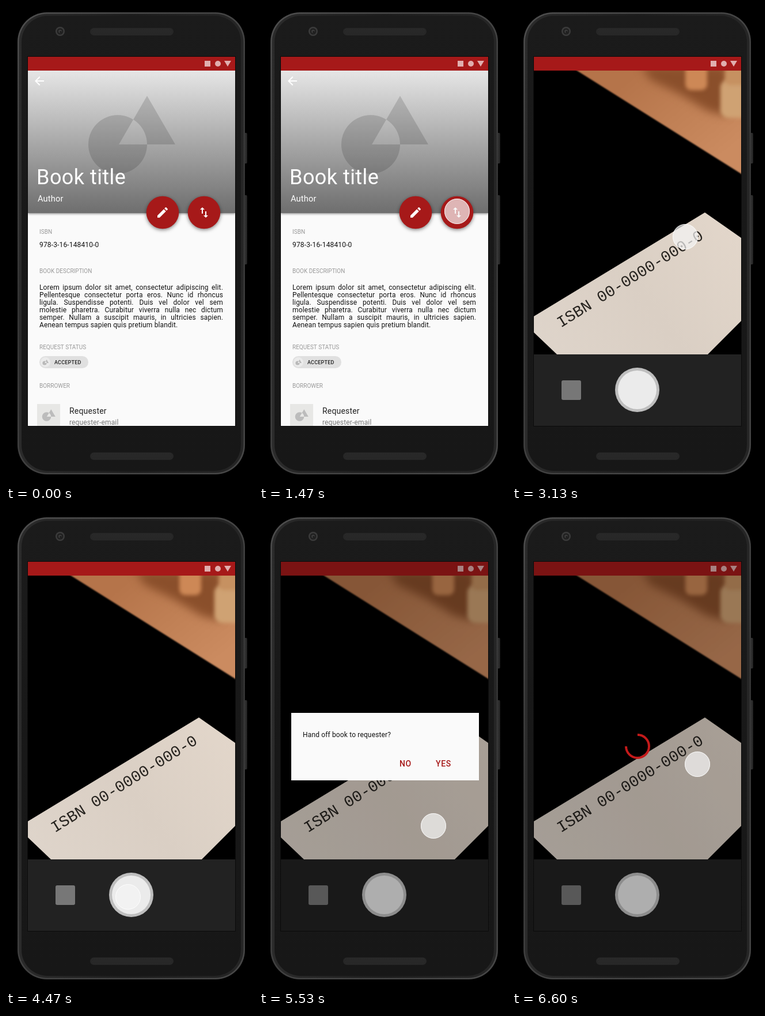
An HTML page with a canvas that plays this animation: 429 px wide and 827 px high, repeating every 8 s.

```html
<!DOCTYPE html>
<html lang="en">
<head>
<meta charset="utf-8">
<title>Book hand-off</title>
<style>
html, body { margin: 0; width: 100%; height: 100%; overflow: hidden; background: #000; }
canvas { display: block; width: 100%; height: 100%; }
</style>
</head>
<body>
<canvas id="stage" width="429" height="827"></canvas>
<script>
const ctx = document.getElementById('stage').getContext('2d');
const LOOP = 8000;
const RED = '#a61919';
const SANS = 'Roboto, sans-serif';

const ICONS = {
  back: 'M20 11H7.83l5.59-5.59L12 4l-8 8 8 8 1.41-1.41L7.83 13H20z',
  edit: 'M3 17.25V21h3.75L17.81 9.94l-3.75-3.75zM20.71 7.04c.39-.39.39-1.02 0-1.41l-2.34-2.34c-.39-.39-1.02-.39-1.41 0l-1.83 1.83 3.75 3.75z',
  swap: 'M16 17.01V10h-2v7.01h-3L15 21l4-3.99zM9 3L5 6.99h3V14h2V6.99h3z'
};

const LOREM = [
  'Lorem ipsum dolor sit amet, consectetur adipiscing elit.',
  'Pellentesque consectetur porta eros. Nunc id rhoncus',
  'ligula. Suspendisse potenti. Duis vel dolor vel sem',
  'molestie pharetra. Curabitur viverra nulla nec dictum',
  'semper. Nullam a suscipit mauris, in ultricies sapien.',
  'Aenean tempus sapien quis pretium blandit.'
];

// Touch positions after the entrance: [time, x, y]
const TOUCH = [
  [1470, 344, 356], [2600, 343, 358], [3070, 332, 371], [3130, 301, 400],
  [3470, 243, 582], [3870, 236, 655], [4130, 211, 673], [4470, 212, 669],
  [5330, 226, 650], [5470, 266, 596], [5530, 303, 546], [5930, 324, 454],
  [6130, 324, 462], [6200, 323, 466], [6270, 323, 446], [6600, 322, 439]
];

function rect(x, y, w, h, fill, r = 0) {
  ctx.fillStyle = fill;
  ctx.beginPath();
  ctx.roundRect(x, y, w, h, r);
  ctx.fill();
}

function disc(x, y, r, fill) {
  ctx.fillStyle = fill;
  ctx.beginPath();
  ctx.arc(x, y, r, 0, Math.PI * 2);
  ctx.fill();
}

function poly(points, fill) {
  ctx.fillStyle = fill;
  ctx.beginPath();
  for (const [x, y] of points) ctx.lineTo(x, y);
  ctx.fill();
}

function gradient(x0, y0, x1, y1, ...colors) {
  const g = ctx.createLinearGradient(x0, y0, x1, y1);
  colors.forEach((c, i) => g.addColorStop(i / (colors.length - 1), c));
  return g;
}

function text(str, x, y, size, color, { weight = 400, spacing = size * 0.0125, family = SANS } = {}) {
  ctx.font = `${weight} ${size}px ${family}`;
  ctx.letterSpacing = spacing + 'px';
  ctx.fillStyle = color;
  ctx.fillText(str, x, y);
}

function label(str, y) {
  text(str, 58, y, 10, '#989898', { spacing: 0 });
}

function justified(str, x, y, width) {
  ctx.font = `400 12px ${SANS}`;
  ctx.letterSpacing = '0.15px';
  const gap = (width - ctx.measureText(str).width) / (str.split(' ').length - 1);
  ctx.wordSpacing = gap + 'px';
  text(str, x, y, 12, '#111');
  ctx.wordSpacing = '0px';
}

function icon(name, x, y) {
  ctx.save();
  ctx.translate(x, y);
  ctx.fillStyle = '#fff';
  ctx.fill(new Path2D(ICONS[name]));
  ctx.restore();
}

// Circle and triangle whose overlap stays empty
function placeholder(x, y, r, fill) {
  ctx.fillStyle = fill;
  ctx.beginPath();
  ctx.arc(x, y, r, 0, Math.PI * 2);
  ctx.moveTo(x + r, y - r * 1.65);
  ctx.lineTo(x + r * 1.96, y);
  ctx.lineTo(x + r * 0.04, y);
  ctx.closePath();
  ctx.fill('evenodd');
}

function withShadow(blur, dy, alpha, draw) {
  ctx.save();
  ctx.shadowColor = `rgba(0,0,0,${alpha})`;
  ctx.shadowBlur = blur;
  ctx.shadowOffsetY = dy;
  draw();
  ctx.restore();
}

function grille(y) {
  rect(146, y, 145, 13, '#272727', 6.5);
  ctx.fillStyle = '#2f2f2f';
  for (let j = 0; j < 4; j++)
    for (let i = 0; i < 46; i++)
      ctx.fillRect(150 + i * 3 + (j % 2) * 1.5, y + 2 + j * 2.6, 1, 1);
}

function phone() {
  rect(0, 0, 429, 827, '#000');
  for (const [y, h] of [[220, 53], [328, 120]])
    rect(413, y, 6, h, gradient(413, 0, 419, 0, '#151515', '#333', '#1c1c1c'), 2);
  rect(20, 11, 395, 801, gradient(20, 11, 415, 812, '#4e4e4e', '#353535', '#484848'), 51);
  rect(22.5, 13.5, 390, 796, gradient(22, 0, 413, 0, '#2b2b2b', '#1d1d1d', '#262626'), 49);
  rect(27, 17, 381, 789, gradient(0, 17, 0, 806, '#1b1b1b', '#181818', '#171717'), 45);
  grille(38);
  grille(774);
  disc(94, 44, 8, '#3b3b3b');
  disc(94, 44, 5.5, '#202020');
  disc(94, 44, 3, '#3a3a3a');
  disc(95, 45, 1.6, '#181818');
  rect(37, 87, 362, 642, '#0b0b0b');
}

function statusBar() {
  const tint = 'rgba(255,255,255,.65)';
  rect(38, 88, 360, 24, RED);
  rect(345, 95, 10, 10, tint);
  disc(368, 100, 5, tint);
  poly([[379, 95], [391, 95], [385, 105]], tint);
}

function bookPage() {
  rect(38, 112, 360, 616, '#fafafa');
  withShadow(4, 1, 0.5, () =>
    rect(38, 112, 360, 247, gradient(0, 112, 0, 359, '#e6e6e6', '#a9a9a9', '#6e6e6e')));
  placeholder(194, 240, 51, 'rgba(0,0,0,.14)');
  statusBar();
  icon('back', 46, 118);
  text('Book title', 53, 309, 36, '#fff');
  text('Author', 55, 339, 14.6, '#fff');

  for (const [x, name] of [[272, 'edit'], [344, 'swap']]) {
    withShadow(6, 2, 0.5, () => disc(x, 358, 28.3, RED));
    icon(name, x - 12, 346);
  }

  label('ISBN', 395);
  text('978-3-16-148410-0', 58, 418, 12, '#111');
  label('BOOK DESCRIPTION', 463);
  LOREM.forEach((line, i) => {
    const y = 492 + i * 13;
    if (i < LOREM.length - 1) justified(line, 58, y, 319);
    else text(line, 58, y, 12, '#111');
  });

  label('REQUEST STATUS', 595);
  rect(58, 607, 85, 21, '#e0e0e0', 10.5);
  disc(68.5, 617.5, 8.5, '#ebebeb');
  placeholder(67, 619, 3.6, '#b8b8b8');
  text('ACCEPTED', 84, 620.5, 9, '#222', { weight: 500, spacing: 0.2 });

  label('BORROWER', 662);
  rect(54, 690, 40, 40, '#e7e7e5');
  placeholder(70.5, 712, 7.8, '#bcbcbc');
  text('Requester', 110, 707, 14, '#222');
  text('requester-email', 110, 726, 12, '#777');
}

function photo() {
  ctx.save();
  ctx.beginPath();
  ctx.rect(38, 112, 360, 492);
  ctx.clip();
  rect(38, 112, 360, 492, '#000');

  // Wooden table with a few blurred objects
  ctx.save();
  ctx.filter = 'blur(1px)';
  poly([[100, 104], [410, 104], [410, 298.5]],
    gradient(220, 112, 350, 270, '#b5744a', '#c08055', '#cb8b60'));
  ctx.filter = 'blur(8px)';
  poly([[225, 104], [375, 104], [372, 190], [340, 182], [290, 152], [240, 128]], '#8a4f2b');
  ctx.filter = 'blur(3px)';
  rect(301, 100, 38, 46, '#cd8856', 10);
  rect(362, 128, 50, 66, '#cfa273', 14);
  rect(370, 105, 40, 32, '#c69161', 8);
  ctx.restore();

  // Paper label
  poly([[38, 538], [335, 358], [398, 402], [398, 546], [340, 604], [78, 604], [38, 566]],
    gradient(60, 600, 380, 380, '#ded4ca', '#dacfc4', '#e2d6ca'));
  ctx.translate(85, 558);
  ctx.rotate(-0.558);
  text('ISBN 00-0000-000-0', 0, 0, 27.2, '#26231f',
    { spacing: 0, family: '"Liberation Mono", monospace' });
  ctx.restore();
}

function cameraPage(dy) {
  rect(38, 88, 360, 24, RED);
  ctx.save();
  ctx.translate(0, dy);
  statusBar();
  photo();
  rect(38, 604, 360, 124, '#222');
  rect(86, 649, 34, 34, '#777', 3);
  disc(217.5, 665.5, 38.5, '#bebebe');
  disc(217.5, 665.5, 33.5, '#ebebeb');
  ctx.restore();
}

function dialog() {
  rect(56, 350, 326, 117, '#fafafa');
  text('Hand off book to requester?', 76, 392, 12, '#111');
  const style = { weight: 500, spacing: 0.6 };
  text('NO', 244, 443, 14, RED, style);
  text('YES', 307, 443, 14, RED, style);
}

function spinner() {
  ctx.strokeStyle = '#c41a1a';
  ctx.lineWidth = 4;
  ctx.beginPath();
  ctx.arc(218, 408, 20, -Math.PI / 2, Math.PI);
  ctx.stroke();
}

function touchAt(t) {
  if (t < 600) return null;
  if (t < 1470) {
    const step = Math.min(11, Math.floor((t - 600) / 72.7));
    const p = (step + 1) / 12;
    const ease = (1 - Math.cos(Math.PI * p)) / 2;
    return [450 - 106 * ease, 236 + 122 * ease];
  }
  return TOUCH.findLast(k => k[0] <= t).slice(1);
}

function touch(x, y) {
  disc(x, y, 22, 'rgba(246,246,246,.71)');
  ctx.strokeStyle = 'rgba(255,255,255,.8)';
  ctx.lineWidth = 1;
  ctx.beginPath();
  ctx.arc(x, y, 21.5, 0, Math.PI * 2);
  ctx.stroke();
}

function render(t) {
  phone();
  ctx.save();
  ctx.beginPath();
  ctx.rect(38, 88, 360, 640);
  ctx.clip();
  if (t < 2600) bookPage();
  else cameraPage(t < 2670 ? 4 : 0);
  if (t >= 4600) {
    rect(38, 88, 360, 640, 'rgba(0,0,0,.26)');
    if (t < 6600) dialog();
    else spinner();
  }
  ctx.restore();
  const pos = touchAt(t);
  if (pos) touch(...pos);
}

const start = performance.now();
function tick() {
  render((performance.now() - start) % LOOP);
  requestAnimationFrame(tick);
}
tick();
</script>
</body>
</html>
```
